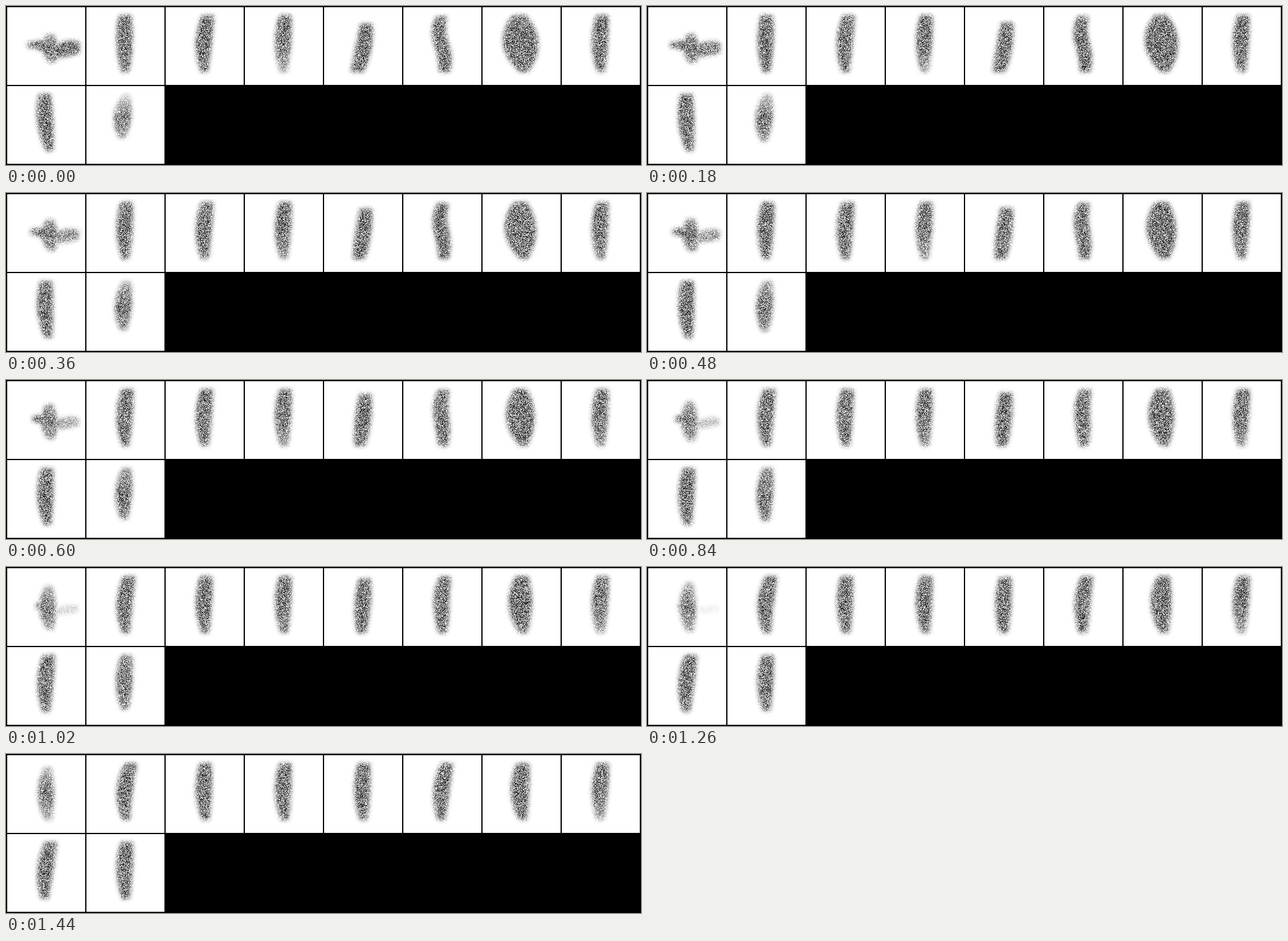
A matplotlib script for the animation above (1500 ms loop, 1042 by 262 pixels).

```python
import numpy as np
import matplotlib.pyplot as plt
from matplotlib.animation import FuncAnimation

W, H, DPI = 1042, 262, 100
FRAMES, INTERVAL = 25, 60
TILE, GAP, COLS = 128, 2, 8
PITCH = TILE + GAP
SOFTNESS = 3.5  # blur of the outlines, in pixels

pix = np.arange(TILE)
blur = np.exp(-0.5 * ((pix[:, None] - pix) / SOFTNESS) ** 2)
blur /= SOFTNESS * np.sqrt(2 * np.pi)


def pose(start, end, mid=62, girth=(10, 13, 6), top=13, bottom=106,
         swing=0, ink=(1, 1, 1)):
    """A slim stroke: its spine, half-widths and ink at top, middle, bottom."""
    return np.array([top, bottom, swing, start, mid, end, *girth, *ink], float)


def curve(points, s):
    """Parabola through three values at s = 0, 0.5 and 1."""
    a, b, c = points
    return a * (2 * s - 1) * (s - 1) + b * 4 * s * (1 - s) + c * s * (2 * s - 1)


def draw(shape):
    """Soft density of one stroke."""
    top, bottom, swing = shape[:3]
    spine, girth, ink = shape[3:].reshape(3, 3)
    s = np.clip((pix - top) / (bottom - top), 0, 1)
    x = curve(spine, s) + swing * np.sin(2 * np.pi * s)
    inside = np.clip(np.minimum(pix - top, bottom - pix) + 1, 0, 1)
    ink = np.interp(s, [0, 0.5, 1], ink) * inside
    gap = curve(girth, s)[:, None] - np.abs(pix - x[:, None])
    fill = np.clip(gap + 0.5, 0, 1) * ink[:, None]
    return blur @ fill @ blur.T


def morph(a, b, power=1, sideways=False):
    """Density as a function of progress from pose a to pose b."""
    def at(t):
        d = draw(a + (b - a) * t ** power)
        return d.T if sideways else d
    return at


# The wing and arm lie sideways, so their spines run along x.
body = morph(pose(70, 73, 70, (6, 13, 6), 45, 90, ink=(.8, 1, .8)),
             pose(66, 67, 63, (6, 13, 6), 19, 107, ink=(.5, 1, .5)), 1.5)
wing = morph(pose(62, 66, 62, (4, 7, 12), 33, 66),
             pose(62, 66, 62, (4, 7, 12), 52, 66), sideways=True)
arm = morph(pose(73, 66, 68, (10, 13, 9), 76, 118),
            pose(71, 66, 68, (3, 4, 4), 76, 114, ink=(0, 0, 0)), sideways=True)

cells = [
    [body, wing, arm],
    [morph(pose(63, 63), pose(73, 65))],
    [morph(pose(69, 63), pose(65, 65))],
    [morph(pose(66, 63, ink=(1, 1, .6)), pose(66, 65))],
    [morph(pose(69, 54, 64, (10, 13, 11), top=27), pose(65, 64))],
    [morph(pose(62, 67, girth=(9, 12, 9), top=15, swing=-3.5), pose(71, 62))],
    [morph(pose(60, 67, girth=(11, 29, 7)), pose(66, 66, 61, (10, 15, 6)))],
    [morph(pose(66, 64), pose(67, 63, ink=(1, 1, .6)))],
    [morph(pose(61, 69), pose(71, 61))],
    [morph(pose(65, 58, 59, (5, 14, 5), bottom=85, ink=(.3, 1, .7)),
           pose(66, 64), 0.7)],
]


def render(frame):
    rng = np.random.default_rng(frame)
    img = np.zeros((H, W))
    for i, parts in enumerate(cells):
        density = np.max([part(frame / (FRAMES - 1)) for part in parts], axis=0)
        row, col = divmod(i, COLS)
        y, x = GAP + row * PITCH, GAP + col * PITCH
        img[y:y + TILE, x:x + TILE] = 1 - density * rng.random((TILE, TILE))
    return img


fig = plt.figure(figsize=(W / DPI, H / DPI), dpi=DPI, facecolor="black")
ax = fig.add_axes([0, 0, 1, 1])
ax.axis("off")
view = ax.imshow(render(0), cmap="gray", vmin=0, vmax=1,
                 interpolation="nearest", aspect="auto")


def update(frame):
    view.set_data(render(frame))
    return [view]


anim = FuncAnimation(fig, update, frames=FRAMES, interval=INTERVAL,
                     repeat=True, repeat_delay=0)
plt.show()
```
